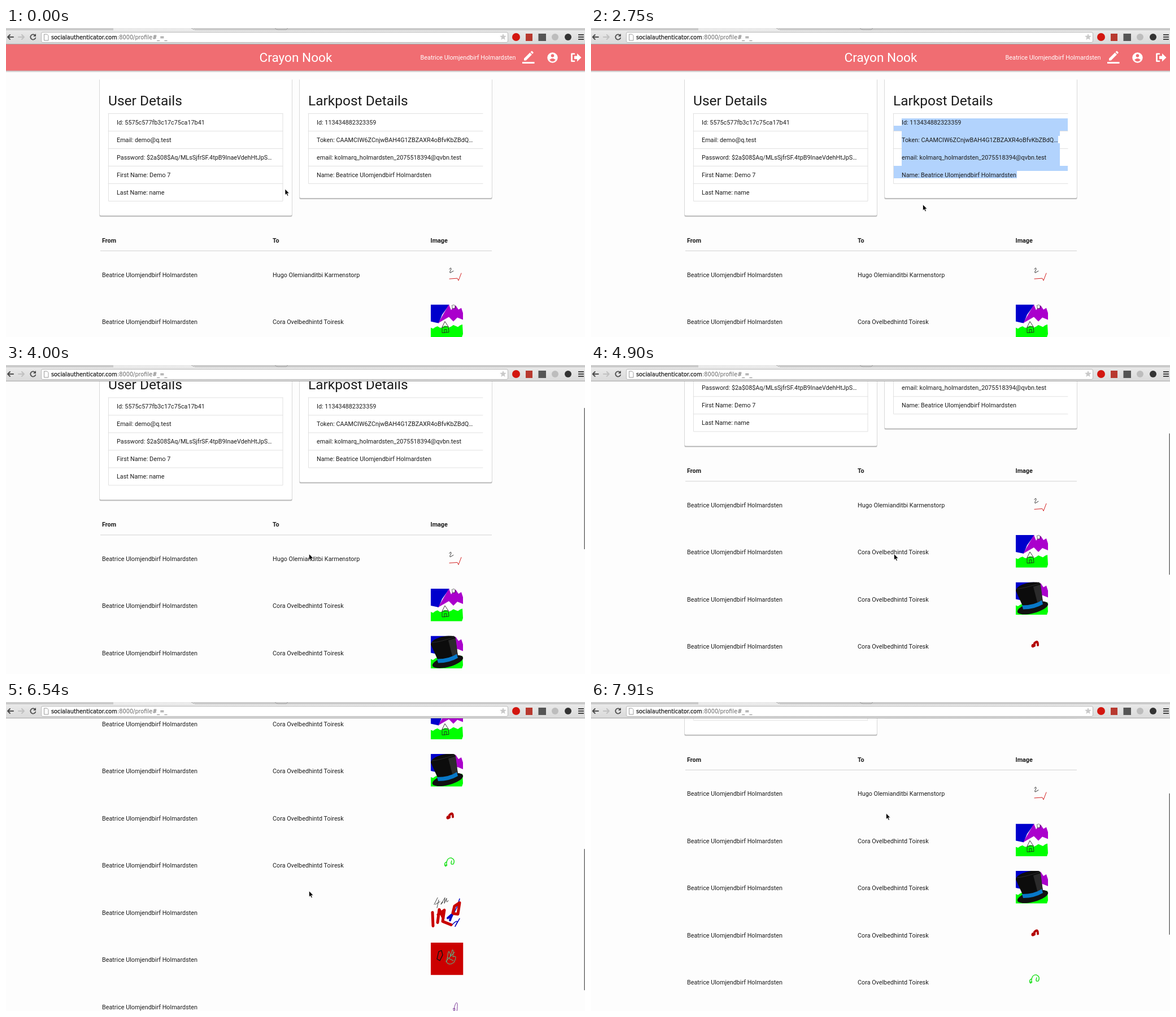
These frames come from a looping animation (1025x547 px, 8000 ms). An HTML page:

```html
<!DOCTYPE html>
<html lang="en">
<head>
<meta charset="utf-8">
<title>Profile</title>
<style>
  html, body { margin: 0; width: 100%; height: 100%; overflow: hidden; background: #fdfdfd; }
  svg { display: block; width: 100vw; height: 100vh; }
  text { font-family: Roboto, sans-serif; font-size: 10.8px; fill: #1c1c1c; white-space: pre; }
  .title { font-size: 24.5px; }
  .brand { font-size: 22.6px; fill: #fff; text-anchor: middle; }
  .head { font-weight: 700; }
  .url { font-family: "DejaVu Sans", sans-serif; font-size: 9.75px; }
  .line { fill: none; stroke-linecap: round; stroke-linejoin: round; }
</style>
</head>
<body>
<svg viewBox="0 0 1025 547">
  <defs>
    <linearGradient id="bar" x2="0" y2="1">
      <stop stop-color="#ececec"/><stop offset="1" stop-color="#d9d9d9"/>
    </linearGradient>
    <linearGradient id="shade" x2="0" y2="1">
      <stop stop-color="#000" stop-opacity=".3"/><stop offset="1" stop-color="#000" stop-opacity="0"/>
    </linearGradient>
    <clipPath id="view"><rect y="29" width="1025" height="518"/></clipPath>
    <clipPath id="thumb"><rect width="57.5" height="57.5"/></clipPath>
  </defs>
  <rect width="1025" height="547" fill="#fdfdfd"/>
  <g clip-path="url(#view)"><g id="page"></g></g>
  <rect id="scrollbar" x="1023.4" width="1.6" height="250" fill="#777"/>

  <g id="chrome">
    <rect width="1025" height="29" fill="url(#bar)"/>
    <path d="M0 1.5H190M332 1.5H1025" stroke="#d0d0d0" stroke-width="3"/>
    <path d="M0 3.3H190M334 3.3H1025" stroke="#aaa" stroke-width=".8"/>
    <path d="M328 0L333 3M476 0Q478 3 482 3H496L499 0" fill="none" stroke="#999" stroke-width=".8"/>
    <rect y="28" width="1025" height="1" fill="#a5a5a5"/>
    <rect x="62.5" y="7.5" width="826" height="18" rx="2.5" fill="#fff" stroke="#b8b8b8"/>
    <g class="line" stroke="#4d4d4d" stroke-width="2">
      <path d="M13 16H3M7 12L3 16L7 20"/>
      <path d="M22 16H32M28 12L32 16L28 20" stroke="#c1c1c1"/>
      <path d="M51.5 13A4.6 4.6 0 1 0 52.3 17.5" stroke-width="1.8"/>
    </g>
    <path d="M53 10V15H48Z" fill="#4d4d4d"/>
    <path d="M67.5 11H72.5L75 13.5V22H67.5Z" fill="#fff" stroke="#999"/>
    <text class="url" x="80" y="20" stroke="#1c1c1c" stroke-width=".25">socialauthenticator.com</text>
    <text class="url" x="197" y="20" style="fill:#666">:8000/profile#_=_</text>
    <path id="star" fill="#c9c9c9"/>
    <circle cx="903" cy="16" r="7" fill="#d3160f"/>
    <rect x="920" y="10" width="12" height="13" fill="#b8392f"/>
    <rect x="942.5" y="10" width="13.5" height="13" fill="#555"/>
    <circle cx="972" cy="16" r="6" fill="#bdbdbd"/>
    <circle cx="995" cy="16" r="6" fill="#333"/>
    <path d="M1013 12H1023M1013 16H1023M1013 20H1023" stroke="#444" stroke-width="2"/>
  </g>

  <path id="arrow" d="M0 0V10.6L2.4 8.4 4.1 12.3 5.9 11.5 4.2 7.7H7.5Z" stroke="#fff" stroke-width=".7"/>
  <path id="beam" class="line" d="M-2-5.5H2M0-5.5V5.5M-2 5.5H2" stroke="#222"/>
</svg>
<script>
const $ = id => document.getElementById(id);
const text = (x, y, s, attrs = '') => `<text x="${x}" y="${y}" ${attrs}>${s}</text>`;
const rect = (x, y, w, h, fill, attrs = '') =>
  `<rect x="${x}" y="${y}" width="${w}" height="${h}" fill="${fill}" ${attrs}/>`;
const stroke = (d, color, width = 1) =>
  `<path class="line" d="${d}" stroke="${color}" stroke-width="${width}"/>`;
const fill = (d, color) => `<path d="${d}" fill="${color}"/>`;

const starPoints = Array.from({ length: 10 }, (_, i) => {
  const r = i % 2 ? 2.7 : 6.2, a = i * Math.PI / 5;
  return [880 + r * Math.sin(a), 16 - r * Math.cos(a)];
});
$('star').setAttribute('d', `M${starPoints.join('L')}Z`);

const sender = 'Beatrice Ulomjendbirf Holmardsten';
const friend = 'Hugo Olemianditbi Karmenstorp';
const pal = 'Cora Ovelbedhintd Toiresk';

// Thumbnails, each drawn in a 57.5 px square
function landscape() {
  let hills = 'M0 58V41';
  for (let x = 4; x < 58; x += 4) hills += `L${x} ${41 - x / 14 + 2 * Math.sin(x * 2)}`;
  return fill('M0 0H33L20 18 14 33 0 30Z', '#00c') +
    fill('M32 0L36 10 43 0 49 9 54 6 57 15V27L47 23 40 30 32 22 13 33Z', '#a0c') +
    fill('M36 0H44L42 7H37Z', '#fff') +
    stroke('M37 2L41 0 44 4M38 3V7H43V3', '#222', .7) +
    fill(hills + 'L57 52 55 58Z', '#0f0');
}

function house() {
  return '<path class="line" fill="#fff" stroke="#222" stroke-width=".9" d="M20 40L25 30 31 39 20 40V50L32 49 31 39M24 50V44H28V49"/>';
}

function hat() {
  return '<ellipse cx="30" cy="45.500" rx="28" ry="9.500" transform="rotate(-15 30 45.500)" fill="#111"/>' +
    fill('M0 15Q1 7 18 2 38-3 43 2L48 36Q30 45 13 44Z', '#0c0c0c') +
    fill('M31 8L44 4 48 35 39 39Z', '#2b2b2b') +
    stroke('M2 12Q16 11 42 2', '#333', .8) +
    fill('M11 41Q33 41 46 32L48 39Q33 48 13 48Z', '#0878c8');
}

function check() {
  return stroke('M33 21Q36 16 36 21 32 28 35 27L40 24', '#222', .9) +
    stroke('M33 38L47 37 49 41 54 28', '#d32020');
}

function redBlob() {
  return stroke('M30 28Q28 32 33 29V25Q39 18 39 28', '#b40000', 4);
}

function greenLoops() {
  return stroke('M28 24Q22 27 26 32 32 28 25 30M28 31Q27 17 36 17 44 20 40 28 34 30 37 22', '#1de01d', 1.4);
}

function greeting() {
  return stroke('M6 16L12 4M11 22L14 8M8 16L16 11M18 14Q25 8 18 16L25 4 24 14 28 5Q27 16 31 9', '#333', .9) +
    stroke('M35 35V43L46 21 51 6M37 53Q46 43 47 47L43 55 51 41', '#0a0ac0', 1.6) +
    stroke('M30 40L37 34 34 44', '#0a0ac0', 4) +
    stroke('M3 30L4 54M12 48L15 25 22 40M13 34L24 26 21 46 36 52M39 31L42 19 51 13 48 33 40 32', '#c80000', 5);
}

function hand() {
  return rect(0, 0, 57.5, 57.5, '#c00') +
    stroke('M14 16L19 14 21 22 16 32 11 29Z', '#111', 1.3) +
    stroke('M28 34L31 17Q33 13 35 24L38 13Q41 12 39 25 48 22 41 35 32 42 27 33L42 17M30 27L40 32', '#5fae82', 1.1);
}

function purpleLoop() {
  return stroke('M39 34Q45 30 42 38L40 39Q44 18 47 24 48 46 39 44', '#7c3b98');
}

const messages = [
  [friend, check], [pal, () => landscape() + house()], [pal, () => landscape() + hat()],
  [pal, redBlob], [pal, greenLoops], ['', greeting], ['', hand], ['', purpleLoop]
];

function card(x, bottom, title, items, closed) {
  const right = x + 309, end = 151.5 + items.length * 31;
  const shadow = rect(x - 15.8, 90, 341.6, bottom - 87.5, '#000', 'rx="2" opacity=".09"') +
    rect(x - 15.4, 90, 340.8, bottom - 88.2, '#000', 'rx="2" opacity=".2"');
  const lines = items.map((_, i) => `M${x} ${151.5 + i * 31}H${right}`).join('');
  return {
    base: shadow + rect(x - 15, 88, 340, bottom - 88, '#fff', 'rx="2"') +
      rect(x - 18, 84, 346, 7, '#fdfdfd') + text(x, 136.5, title, 'class="title"') +
      stroke(`${lines}M${x + .5} 151.5V${end}H${right}${closed ? 'V151.5' : ''}`, '#e1e1e1'),
    words: items.map((s, i) => text(x + 15, 170.8 + i * 31, s)).join('')
  };
}

const userCard = card(181, 332, 'User Details', [
  'Id: 5575c577fb3c17c75ca17b41', 'Email: demo@q.test',
  'Password: $2a$08$Aq/MLsSjfrSF.4tpB9InaeVdehHtJpS…', 'First Name: Demo 7', 'Last Name: name'
], true);
const socialCard = card(535, 301, 'Larkpost Details', [
  'Id: 113434882323359', 'Token: CAAMCIW6ZCnjwBAH4G1ZBZAXR4oBfvKbZBdQ…',
  'email: kolmarq_holmardsten_2075518394@qvbn.test', 'Name: ' + sender
]);

const header = rect(0, 75, 1025, 4, 'url(#shade)') + rect(0, 28, 1025, 47.5, '#f06d72') +
  text(513, 59.5, 'Crayon Nook', 'class="brand"') +
  text(902.5, 56, sender, 'text-anchor="end" style="fill:#fff"') +
  rect(914, 60, 21.5, 3, '#fff') +
  fill('M917 54L927.5 43.5 931 47 920.5 57.5H917ZM928.5 42.5L931 40.5 934 43.5 932 46Z', '#fff') +
  '<circle cx="967.5" cy="52.5" r="9.2" fill="#fff"/><circle cx="967.5" cy="49" r="2.8" fill="#f06d72"/>' +
  fill('M962 56.5Q967.5 51 973 56.5 967.5 62 962 56.5Z', '#f06d72') +
  stroke('M1006 45.7H1001.5V58.8H1006', '#fff', 2.6) +
  fill('M1006 49.5H1011V45L1018.5 52.2 1011 59.5V55H1006Z', '#fff');

const table = text(170, 379.8, 'From', 'class="head"') + text(472, 379.8, 'To', 'class="head"') +
  text(751.5, 379.8, 'Image', 'class="head"') + rect(167, 394, 693, 1, '#d3d3d3') +
  messages.map(([to, picture], i) => {
    const y = 436.6 + i * 83.5;
    return text(170, y + 3.9, sender) + text(472, y + 3.9, to) +
      `<g transform="translate(752 ${y - 30.5})" clip-path="url(#thumb)">${picture()}</g>`;
  }).join('');

$('page').innerHTML = header + userCard.base + userCard.words + socialCard.base +
  '<path id="selection" fill="#b2d3fd"/>' + socialCard.words + table;

// Highlight left by dragging from the first list row down to the given row
function highlight(rows) {
  if (!rows) return '';
  if (rows === 1) return 'M550 160H656V173H550Z';
  const top = 'M550 160H844V182H536V173H550Z';
  if (rows === 2) return top + 'M550 182H700V204H550Z';
  if (rows === 3) return top + 'M550 182H830V213H790V235H550Z';
  return top + 'M550 182H830V191H827V204H830V244H844V253H754V266H536V244H550Z';
}

// Runs of evenly spaced screen updates: first, last, count
const runs = [
  [300, 1360, 8], [1660, 2750, 8], [3050, 3200, 2], [3640, 4180, 4],
  [4540, 5440, 6], [5610, 5790, 2], [6000, 6540, 4], [6720, 7910, 8]
];
const scrollKeys = [
  [3450, 0], [3640, 14], [4000, 93.6], [4540, 112], [4900, 188.7], [5440, 338],
  [5790, 423.7], [6180, 469], [6540, 481.2], [6720, 460], [7220, 335], [7560, 283], [7910, 274.2]
];
const pointerKeys = [
  [0, 494, 285], [760, 588, 186], [1220, 547, 167], [1360, 551, 172.5], [1660, 556, 176],
  [2140, 587, 262], [2610, 590, 318], [2750, 587.5, 312.5], [3200, 536.5, 334.5],
  [7390, 536.5, 334.5], [7910, 522.5, 197]
];

function lastUpdate(ms) {
  const run = runs.findLast(r => r[0] <= ms);
  if (!run) return 0;
  const [first, last, count] = run, gap = (last - first) / (count - 1);
  return first + gap * Math.min(count - 1, Math.floor((ms - first + 1) / gap));
}

function along(keys, t) {
  const i = keys.findIndex(k => k[0] >= t);
  if (i < 0) return keys.at(-1).slice(1);
  if (i === 0) return keys[0].slice(1);
  const [from, to] = [keys[i - 1], keys[i]], p = (t - from[0]) / (to[0] - from[0]);
  return from.slice(1).map((v, n) => v + (to[n + 1] - v) * p);
}

function draw(ms) {
  const t = lastUpdate(ms);
  const [scroll] = along(scrollKeys, t), [x, y] = along(pointerKeys, t);
  const dragging = t >= 1660 && t < 3050;
  const typing = (t >= 1360 && t < 2740) || (t >= 5790 && t < 6180);
  $('page').setAttribute('transform', `translate(0 ${-scroll})`);
  $('selection').setAttribute('d', highlight(dragging ? Math.min(4, 1 + Math.floor((t - 1650) / 155)) : 0));
  $('scrollbar').setAttribute('y', 31.6 + scroll * .475);
  $('scrollbar').style.display = scroll ? '' : 'none';
  for (const [id, shown] of [['arrow', !typing], ['beam', typing]]) {
    $(id).setAttribute('transform', `translate(${x} ${y})`);
    $(id).style.display = shown ? '' : 'none';
  }
}

const start = performance.now();
function tick() {
  draw((performance.now() - start) % 8000);
  requestAnimationFrame(tick);
}
tick();
</script>
</body>
</html>
```
